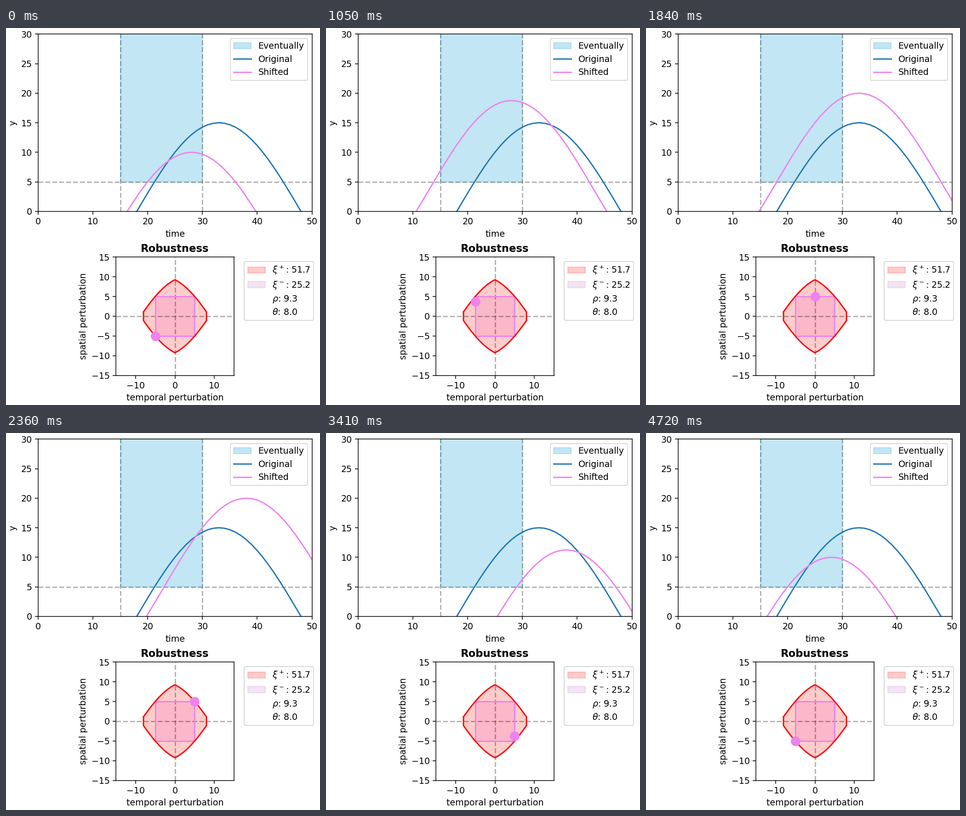
These frames come from a looping animation (683x820 px, 4990 ms). A matplotlib script:

```python
import numpy as np
import matplotlib.pyplot as plt
from matplotlib.animation import FuncAnimation
from matplotlib.lines import Line2D
from matplotlib.patches import Patch

W, H = 683, 820
DPI = H / 6
LOOP, FRAMES = 4990, 192
HOLD, STEP, STEPS = 270, 130, 8          # ms at a corner, ms per step, steps per side
SIDE = HOLD + (STEPS - 1) * STEP
CORNERS = np.array([(-5, -5), (-5, 5), (5, 5), (5, -5)], float)

plt.rcParams.update({"font.family": "DejaVu Sans", "font.size": 10})
fig = plt.figure(figsize=(5, 6), dpi=DPI, facecolor="white")


def axes_at(left, top, right, bottom):
    w = 5 * DPI
    return fig.add_axes([left / w, 1 - bottom / H, (right - left) / w, (bottom - top) / H])


def guide(draw, *places):
    for p in places:
        draw(p, color="black", alpha=0.3, ls="--", lw=1.5)


def signal(t):
    return 15 * np.sin(np.pi * (t - 18) / 30)


# Signal and its shifted copy
t = np.arange(0, 61)
top = axes_at(70, 13.2, 665.5, 399)
top.set(xlim=(0, 50), ylim=(0, 30), xlabel="time", ylabel="y",
        xticks=range(0, 51, 10), yticks=range(0, 31, 5))
top.fill_between([15, 30], 5, 30, color="skyblue", alpha=0.5, label="Eventually")
guide(top.axhline, 5)
guide(top.axvline, 15, 30)
top.plot(t, signal(t), color="tab:blue", label="Original")
shifted, = top.plot([], [], color="violet", label="Shifted")
top.legend(loc="upper right")

# Robustness region
rob = axes_at(239, 498.3, 496, 755.5)
rob.set(xlim=(-15, 15), ylim=(-15, 15), xticks=(-10, 0, 10), yticks=range(-15, 16, 5),
        xlabel="temporal perturbation", ylabel="spatial perturbation")
rob.set_title("Robustness", fontweight="bold")
guide(rob.axhline, 0)
guide(rob.axvline, 0)

rob.fill_between([-5, 5], -5, 5, color="violet", alpha=0.2)
rob.plot(*np.vstack([CORNERS, CORNERS[:1]]).T, color="violet")

dx = np.arange(-8, 9)
edge = signal(30 - abs(dx)) - 5
rob.fill_between(dx, -edge, edge, color="red", alpha=0.2)
rob.plot(np.r_[dx, dx[::-1], dx[0]], np.r_[edge, -edge[::-1], edge[0]], color="red")
dot, = rob.plot([], [], "o", color="violet", ms=10)

blank = Line2D([], [], ls="none")
rob.legend([Patch(color="red", alpha=0.2), Patch(color="purple", alpha=0.1), blank, blank],
           [r"$\xi^+$: 51.7", r"$\xi^-$: 25.2", r"$\rho$: 9.3", r"$\theta$: 8.0"],
           loc="upper left", bbox_to_anchor=(1.05, 1), labelspacing=0.43)


def shift_at(ms):
    """Perturbation (time, space): stepwise walk around the square."""
    side, rest = divmod(ms, SIDE)
    k = np.clip((rest - HOLD) // STEP + 1, 0, STEPS)
    a, b = CORNERS[int(side) % 4], CORNERS[int(side + 1) % 4]
    return a + (b - a) * k / STEPS


def update(i):
    x, y = shift_at((i + 1) * LOOP / FRAMES - 1e-3)
    shifted.set_data(t + x, signal(t) + y)
    dot.set_data([x], [y])
    return shifted, dot


anim = FuncAnimation(fig, update, frames=FRAMES, interval=LOOP / FRAMES,
                     repeat=True, repeat_delay=0, blit=False)
plt.show()
```
